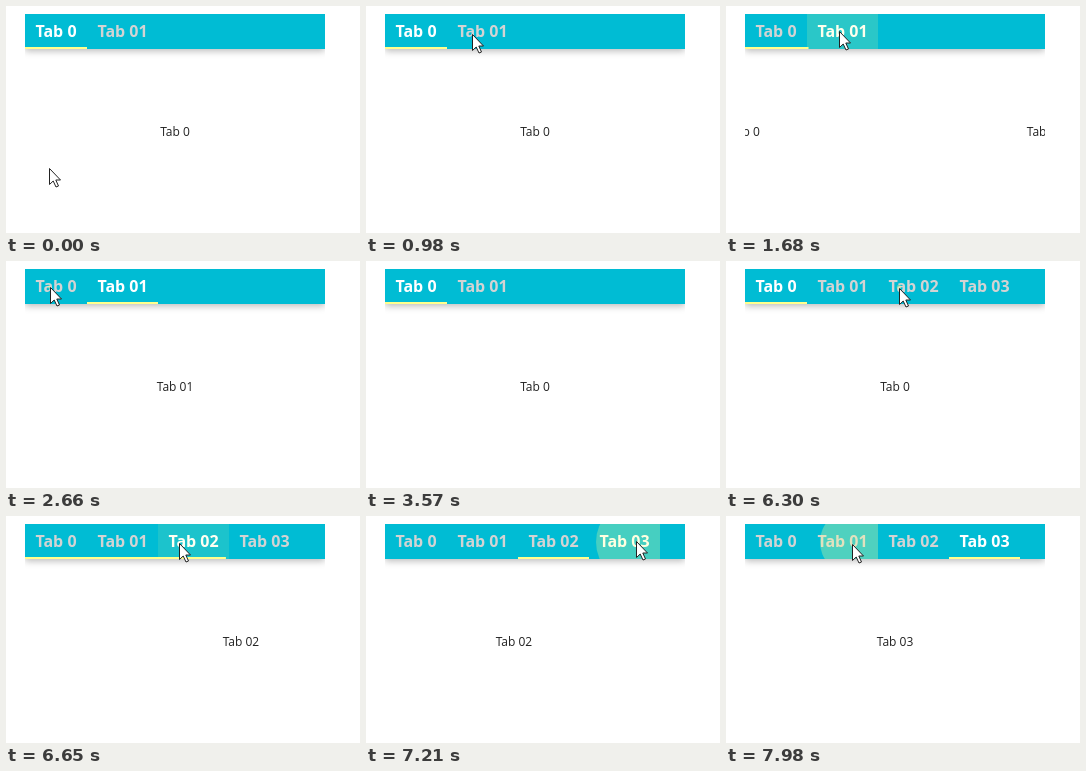
Recreate the animation shown at these times as an HTML page with a canvas. Size 354 px wide and 227 px high, loop 8 s.

```html
<!DOCTYPE html>
<html lang="en">
<head>
<meta charset="utf-8">
<title>Sliding tabs</title>
<style>
  html, body { margin: 0; width: 100%; height: 100%; overflow: hidden; background: #fff; }
  canvas { display: block; }
</style>
</head>
<body>
<canvas width="354" height="227"></canvas>
<script>
const ctx = document.querySelector('canvas').getContext('2d');
const LOOP = 8000, STEP = 70;
const PANE = { x: 19, y: 8, w: 300, h: 219 }, BAR_H = 35;

const tabs = [
  { name: 'Tab 0', x: 19, w: 62, opens: -1000 },
  { name: 'Tab 01', x: 81, w: 71, opens: -1000 },
  { name: 'Tab 02', x: 152, w: 71, opens: 4194 },
  { name: 'Tab 03', x: 223, w: 71, opens: 5018 }
];

// press starts the ripple, select starts the page change
const clicks = [
  { tab: 0, press: -2000, select: -2000, x: 43 },
  { tab: 1, press: 1395, select: 1520, x: 113 },
  { tab: 0, press: 2655, select: 2750, x: 43 },
  { tab: 2, press: 6293, select: 6390, x: 173 },
  { tab: 3, press: 7072, select: 7162, x: 271 },
  { tab: 1, press: 7886, select: 8000, x: 126 }
];

// time, x, y of the pointer tip
const pointerPath = [
  [0, 43, 162], [70, 39, 161], [140, 39, 161], [210, 36, 161], [280, 36, 161],
  [350, 33, 160], [420, 33, 160], [1050, 109, 23], [1120, 109, 23], [1260, 113, 25],
  [1900, 113, 25], [2170, 55, 26], [2380, 44, 26], [3220, 44, 26], [3500, 0, 60],
  [3570, -30, 70], [5740, -30, 85], [5810, 38, 73], [6020, 170, 30], [6090, 170, 30],
  [6160, 173, 27], [6860, 173, 27], [7070, 270, 25], [7350, 270, 25],
  [7700, 130, 28], [7770, 126, 28], [8000, 126, 28]
];
const arrow = new Path2D('M.5 .5V16.5L4.2 13 7 19 9.5 18 6.8 12H11.5Z');

const clamp = v => Math.min(1, Math.max(0, v));
const mix = (a, b, p) => a + (b - a) * p;

function easeBoth(v) {
  const p = clamp(v);
  if (p < 0.2) return 3.125 * p * p;
  if (p > 0.8) return 1 - 3.125 * (1 - p) ** 2;
  return 1.25 * p - 0.125;
}

// y of the cubic Bezier (.0825,.3025,.0875,.9975) at x
function rippleEase(x) {
  const bezier = (s, a, b) => 3 * (1 - s) ** 2 * s * a + 3 * (1 - s) * s * s * b + s ** 3;
  let lo = 0, hi = 1;
  for (let i = 0; i < 20; i++) {
    const mid = (lo + hi) / 2;
    if (bezier(mid, 0.0825, 0.0875) < x) lo = mid; else hi = mid;
  }
  return bezier(lo, 0.3025, 0.9975);
}

function box(x, y, w, h, color) {
  ctx.fillStyle = color;
  ctx.fillRect(x, y, w, h);
}

function label(text, x, y, font, color) {
  ctx.font = font + " 'Open Sans', 'Noto Sans', sans-serif";
  ctx.fillStyle = color;
  ctx.fillText(text, x, y);
}

function clipped(x, y, w, h, draw) {
  ctx.save();
  ctx.beginPath();
  ctx.rect(x, y, w, h);
  ctx.clip();
  draw();
  ctx.restore();
}

function drawPages(t, from, to, start) {
  const offset = mix(from, to, easeBoth((t - start) / 320)) * PANE.w;
  tabs.forEach((tab, i) => {
    if (t >= tab.opens) label(tab.name, 169 + i * PANE.w - offset, 130, '12px', '#222');
  });
}

function drawBar() {
  ctx.save();
  ctx.shadowColor = 'rgba(0,0,0,.28)';
  ctx.shadowBlur = 7;
  ctx.shadowOffsetY = 2;
  box(PANE.x, PANE.y, PANE.w, BAR_H, '#00bcd4');
  ctx.restore();
}

function drawTab(tab, t, selected) {
  if (t < tab.opens) return;
  const width = tab.w * clamp((t - tab.opens) / 150);
  ctx.font = "bold 16px 'Open Sans', 'Noto Sans', sans-serif";
  let text = tab.name;
  if (width < tab.w) {
    let kept = tab.name.length;
    do text = tab.name.slice(0, --kept) + '...';
    while (kept > 0 && ctx.measureText(text).width > width - 20);
  }
  label(text, tab.x + width / 2, 31, 'bold 16px', selected ? '#fff' : '#d3d3d3');
}

function drawRipple(click, t) {
  const age = t - click.press;
  if (age < 0 || age > 500) return;
  const tab = tabs[click.tab];
  clipped(tab.x, PANE.y, tab.w, BAR_H, () => {
    ctx.fillStyle = `rgba(255,255,141,${0.38 * (1 - age / 500)})`;
    ctx.beginPath();
    ctx.arc(click.x, 26, 75 * rippleEase(age / 900), 0, 2 * Math.PI);
    ctx.fill();
  });
}

// The leading edge stretches first, then the trailing edge follows.
function drawLine(t, from, to, start) {
  const lead = easeBoth((t - start) / 120), trail = easeBoth((t - start - 120) / 120);
  const right = to.x > from.x;
  const x1 = mix(from.x, to.x, right ? trail : lead);
  const x2 = mix(from.x + from.w, to.x + to.w, right ? lead : trail);
  box(x1, 41, x2 - x1, 2, '#ffff8d');
}

function drawPointer(t) {
  const i = Math.max(1, pointerPath.findIndex(point => point[0] >= t));
  const [t0, x0, y0] = pointerPath[i - 1], [t1, x1, y1] = pointerPath[i];
  const v = clamp((t - t0) / (t1 - t0)), p = v * v * (3 - 2 * v);
  ctx.save();
  ctx.translate(Math.round(mix(x0, x1, p)), Math.round(mix(y0, y1, p)));
  ctx.fillStyle = '#fff';
  ctx.strokeStyle = '#222';
  ctx.fill(arrow);
  ctx.stroke(arrow);
  ctx.restore();
}

function draw(t) {
  const done = clicks.filter(click => click.select <= t);
  const current = done[done.length - 1], previous = done[done.length - 2] || current;
  box(0, 0, 354, 227, '#fff');
  ctx.textAlign = 'center';
  clipped(PANE.x, PANE.y, PANE.w, PANE.h, () => {
    drawPages(t, previous.tab, current.tab, current.select);
    drawBar();
    tabs.forEach((tab, i) => drawTab(tab, t, i === current.tab));
    clicks.forEach(click => drawRipple(click, t));
    drawLine(t, tabs[previous.tab], tabs[current.tab], current.select + 150);
  });
  drawPointer(t);
}

const began = performance.now();
function tick() {
  const t = (performance.now() - began) % LOOP;
  draw(Math.floor(t / STEP) * STEP);
  requestAnimationFrame(tick);
}
tick();
</script>
</body>
</html>
```
